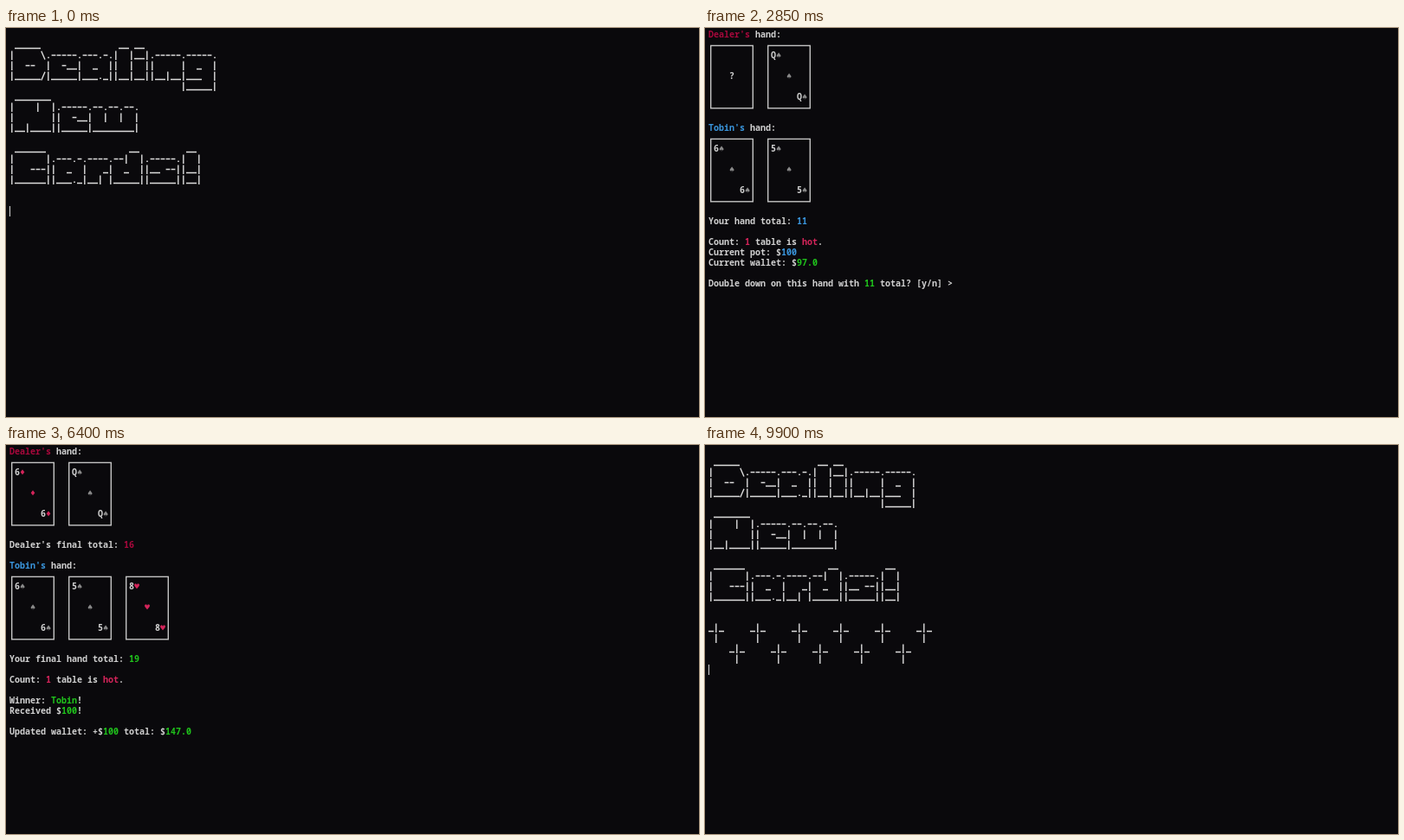
Recreate the animation shown at these times as an HTML page with a canvas. Size 800 px wide and 450 px high, loop 9.95 s.

```html
<!DOCTYPE html>
<html lang="en">
<head>
<meta charset="utf-8">
<title>Terminal blackjack</title>
<style>
html, body { margin: 0; width: 100%; height: 100%; overflow: hidden; background: #0a090c; }
canvas { display: block; }
</style>
</head>
<body>
<canvas id="stage" width="800" height="450"></canvas>
<script>
const ctx = document.getElementById('stage').getContext('2d');
const LOOP = 9950, LEFT = 4, TOP = 2, CELL = 6, ROW = 12;
const FONT = '600 10px "Noto Sans Mono", "DejaVu Sans Mono", monospace';
const SUIT_FONT = '10px "DejaVu Sans Mono", "DejaVu Sans", monospace';
const COLORS = {
  w: '#d0d0d0', r: '#d4245a', d: '#a8083c', b: '#3a96dd',
  g: '#20c41c', c: '#7fcfc8', s: '#8a8a8a'
};
const PLAYER = 'Tobin';

const BANNER = String.raw`
 _____               __ __
|     \.-----.---.-.|  |__|.-----.-----.
|  --  |  -__|  _  ||  |  ||     |  _  |
|_____/|_____|___._||__|__||__|__|___  |
                                 |_____|
 _______
|    |  |.-----.--.--.--.
|       ||  -__|  |  |  |
|__|____||_____|________|

 ______                __         __
|      |.---.-.----.--|  |.-----.|  |
|   ---||  _  |   _|  _  ||__ --||__|
|______||___._|__| |_____||_____||__|`.split('\n');

const STARS = ['_|_     '.repeat(6), ' |      '.repeat(6),
               '    _|_ '.repeat(5), '     |  '.repeat(5)];

// Strokes of the line-art characters inside one cell: x1, y1, x2, y2
const STROKES = {
  '_': [0, 9.5, 6, 9.5],
  '-': [0.6, 5.5, 5.4, 5.5],
  '|': [2.8, 0.4, 2.8, 11],
  '.': [2.2, 8.2, 3.8, 8.2],
  '\\': [0.8, 0.8, 5, 10.5],
  '/': [5, 0.8, 0.8, 10.5]
};

function art(row, text) {
  ctx.strokeStyle = '#dcdcdc';
  ctx.lineWidth = 1.4;
  ctx.beginPath();
  [...text].forEach((char, col) => {
    if (!STROKES[char]) return;
    const [x1, y1, x2, y2] = STROKES[char];
    const x = LEFT + col * CELL, y = TOP + row * ROW;
    ctx.moveTo(x + x1, y + y1);
    ctx.lineTo(x + x2, y + y2);
  });
  ctx.stroke();
}

function put(row, col, text, color = 'w', font = FONT) {
  ctx.font = font;
  ctx.fillStyle = COLORS[color];
  ctx.fillText(text, LEFT + col * CELL, TOP + row * ROW + 9);
}

// Text between tildes is coloured by its first letter: "~r12~"
function line(row, markup) {
  let col = 0;
  markup.split('~').forEach((part, i) => {
    const text = i % 2 ? part.slice(1) : part;
    put(row, col, text, i % 2 ? part[0] : 'w');
    col += text.length;
  });
}

function card(row, col, face) {
  ctx.strokeStyle = '#c4c4c4';
  ctx.lineWidth = 1.4;
  ctx.strokeRect(LEFT + col * CELL + 2.7, TOP + row * ROW + 6.4, 48.6, 72.4);
  if (face === '?') return put(row + 3, col + 4, '?');
  const [rank, suit] = face;
  const color = suit === '♠' ? 's' : 'r';
  const pip = (r, c) => put(r, c, suit, color, SUIT_FONT);
  put(row + 1, col + 1, rank);
  pip(row + 1, col + 2);
  pip(row + 3, col + 4);
  put(row + 5, col + 6, rank);
  pip(row + 5, col + 7);
}

function hand(row, title, faces) {
  line(row, title + ' hand:');
  faces.forEach((face, i) => card(row + 1, i * 11, face));
}

const dealer = faces => hand(0, "~dDealer's~", faces);
const player = (row, faces) => hand(row, `~b${PLAYER}'s~`, faces);

// Each screen returns the cursor's row and column.
function dealing(pairs) {
  BANNER.forEach((text, row) => art(row, text));
  for (let i = 0; i < pairs * 4; i++) art(17 + i, STARS[i % 4]);
  return [17 + pairs * 4, 0];
}

function betting(typed) {
  dealer(['?', '?']);
  player(9, ['?', '?']);
  line(18, 'Your hand total: ~b?~');
  line(20, 'Count: ~c-1~ table is ~ccold.~');
  line(21, 'Current wallet: $~g147.0~');
  line(23, 'Enter your bet: > $' + typed);
  return [23, 19 + typed.length];
}

function doubling(typed) {
  dealer(['?', 'Q♠']);
  player(9, ['6♠', '5♠']);
  line(18, 'Your hand total: ~b11~');
  line(20, 'Count: ~r1~ table is ~rhot~.');
  line(21, 'Current pot: $~b100~');
  line(22, 'Current wallet: $~g97.0~');
  line(24, 'Double down on this hand with ~g11~ total? [y/n] > ' + typed);
  return [24, 48 + typed.length];
}

function result(dots, prompt) {
  dealer(['6♦', 'Q♠']);
  line(9, "Dealer's final total: ~d16~");
  player(11, ['6♠', '5♠', '8♥']);
  line(20, 'Your final hand total: ~g19~');
  line(22, 'Count: ~r1~ table is ~rhot~.');
  line(24, `Winner: ~g${PLAYER}~!`);
  line(25, 'Received $~g100~!');
  line(27, 'Updated wallet: +$~g100~ total: $~g147.0~');
  if (dots) line(29, '...');
  if (!prompt) return [29, 0];
  line(31, "[Enter] to play again, 'Q' to quit >");
  return [31, 37];
}

function screen(t) {
  if (t < 1000) return dealing(Math.floor((t - 50) / 240) + 1);
  if (t < 2150) return betting('50'.slice(0, t < 1500 ? 0 : t < 1700 ? 1 : 2));
  if (t < 5750) return doubling(t < 5350 ? '' : 'y');
  if (t < 9450) return result(t >= 6500, t >= 6700);
  return dealing(t < 9720 ? 0 : 1);
}

function cursorOn(t) {
  const typing = t < 200 || (t >= 5350 && t < 5750);
  return typing || (t - 4440 + 1060 * 5) % 1060 < 530;
}

function draw(now) {
  const t = now % LOOP;
  ctx.fillStyle = '#0a090c';
  ctx.fillRect(0, 0, 800, 450);
  const [row, col] = screen(t);
  if (cursorOn(t)) {
    ctx.fillStyle = '#d8d8d8';
    ctx.fillRect(LEFT + col * CELL, TOP + row * ROW, 1, 12);
  }
  requestAnimationFrame(draw);
}
requestAnimationFrame(draw);
</script>
</body>
</html>
```
